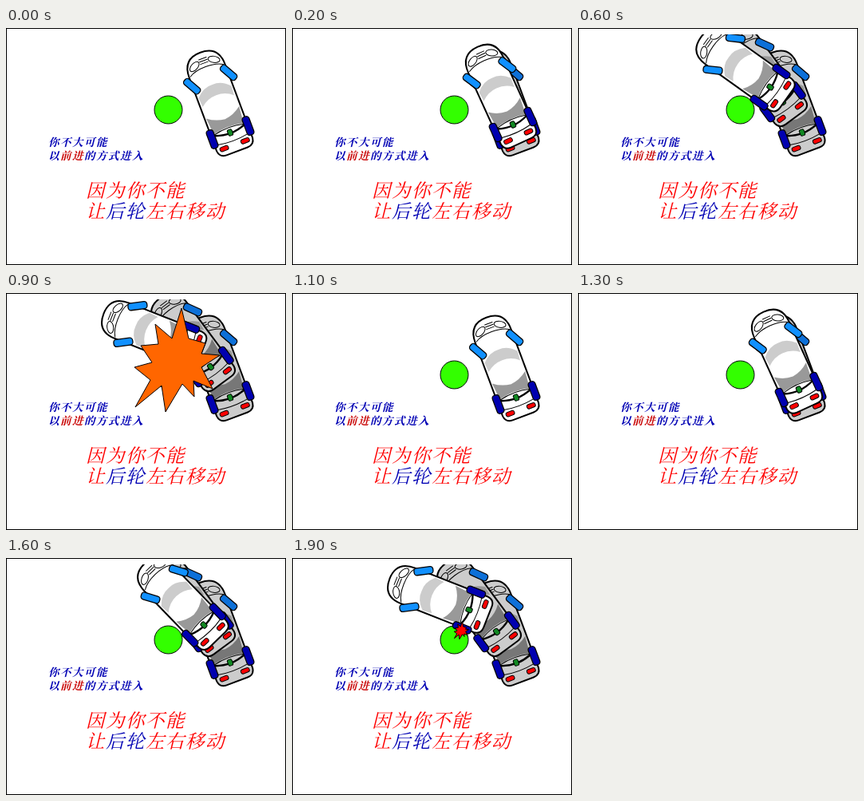
An HTML page for the animation above (2000 ms loop, 351 px wide and 297 px high).

```html
<!DOCTYPE html>
<html lang="zh">
<head>
<meta charset="utf-8">
<style>
  html, body { margin: 0; width: 100%; height: 100%; overflow: hidden; background: #fff; }
  svg { display: block; width: 351px; height: 297px; }
  text { font-family: "Noto Serif CJK SC", "Noto Sans CJK SC", "Noto Sans CJK", serif; font-style: italic; }
  .note { font-size: 13.5px; font-weight: 700; letter-spacing: 1.5px; fill: #0000b4; }
  .reason { font-size: 23.5px; font-weight: 500; letter-spacing: 1.5px; fill: #f00; }
  .red { fill: #c80000; }
  .blue { fill: #0000b4; }
  .car { --body: #fff; --screen: #ccc; --rear: #999; --front: #1090ff; }
  .ghost { --body: #ccc; --screen: #999; --rear: #777; --front: #0d70d8; }
</style>
</head>
<body>
<svg viewBox="0 0 351 297">
  <defs>
    <clipPath id="road"><rect x="1" y="8" width="349" height="288"/></clipPath>
    <rect id="tyre" x="-4.5" y="-12" width="9" height="24" rx="3.5" stroke="#000" stroke-width="1.3"/>
    <g id="lamp">
      <ellipse cx="-13" cy="-93" rx="7.5" ry="4" transform="rotate(-28 -13 -93)" fill="var(--body)"/>
    </g>
    <!-- Origin: middle of the rear axle; the nose points up. -->
    <g id="car" stroke="#000" stroke-linecap="round">
      <path d="M-24 16V-82C-24 -100 -14 -107 0 -107S24 -100 24 -82V16Q23 25 14 25H-14Q-23 25 -24 16Z"
            fill="var(--body)" stroke-width="2"/>
      <path d="M-22 -83Q-14 -88 0 -88Q14 -88 22 -83M-5 -99H5M-5 -96H5M-5 -93H5" fill="none"/>
      <use href="#lamp"/>
      <use href="#lamp" transform="scale(-1 1)"/>
      <path d="M-22 -54Q-12 -65 0 -64Q12 -65 22 -54L21 -42Q12 -50 0 -50Q-12 -50 -21 -42Z"
            fill="var(--screen)" stroke="none"/>
      <path d="M-22 -27Q-12 -19 0 -18Q12 -19 22 -27L20 -5Q0 -10 -20 -5Z"
            fill="var(--rear)" stroke="none"/>
      <path d="M-21 9Q0 13 21 9M-20 -4Q0 -9 20 -4" fill="none"/>
      <path d="M-20 -3Q0 5 20 -3" fill="none" stroke-width="2.4"/>
      <rect x="-3" y="-4" width="6" height="8" rx="2" fill="#118822"/>
      <use href="#tyre" x="-24" fill="#0000b0"/>
      <use href="#tyre" x="24" fill="#0000b0"/>
      <use href="#tyre" transform="translate(-24.5 -71) rotate(-29)" fill="var(--front)"/>
      <use href="#tyre" transform="translate(24.5 -71) rotate(-29)" fill="var(--front)"/>
      <rect x="-19.5" y="13.5" width="11" height="5.5" rx="2.5" fill="#f00"/>
      <rect x="8.5" y="13.5" width="11" height="5.5" rx="2.5" fill="#f00"/>
    </g>
  </defs>
  <rect width="351" height="297" fill="#fff"/>
  <g clip-path="url(#road)">
    <circle cx="203.5" cy="102.5" r="17.5" fill="#33ff00" stroke="#000"/>
    <use id="startGhost" class="ghost" href="#car"/>
    <use id="midGhost" class="ghost" href="#car"/>
    <use id="mover" class="car" href="#car"/>
    <path id="burst" stroke="#000" vector-effect="non-scaling-stroke"
          d="M8 -73L17 -35L38 -29L33 -16L56 -14L33 1L47 28L23 18L24 38L9 22L-12 57L-17 24L-50 51L-31 17L-51 1L-29 -5L-43 -26L-21 -28L-25 -53L-4 -35Z"/>
  </g>
  <text class="note" x="53" y="148">你不大可能</text>
  <text class="note" x="53" y="165">以<tspan class="red">前进</tspan>的方式进入</text>
  <text class="reason" x="100" y="212">因为你不能</text>
  <text class="reason" x="100" y="238">让<tspan class="blue">后轮</tspan>左右移动</text>
  <rect x=".5" y=".5" width="350" height="296" fill="none" stroke="#000"/>
</svg>
<script>
  const STEP = 100, LOOP = 2000, RUN = 11, MID = 4;

  // Rear axle x, y and heading for each step of the drive.
  const poses = [
    [281, 131, -20.5], [279.5, 127, -22], [277, 121, -24.5],
    [268, 107, -30], [256.5, 92.5, -36.5], [248, 84, -44],
    [241, 74, -54.5], [232, 69, -62], [222, 65, -68.5]
  ];
  const last = poses.length - 1;
  // Size and colour of the crash from the moment of contact.
  const bursts = [[0.17, "#ff0000"], [1, "#ff6600"], [1.65, "#ff6600"]];

  const byId = id => document.getElementById(id);
  const show = (el, on) => el.setAttribute("visibility", on ? "visible" : "hidden");
  const place = (el, [x, y, angle]) =>
    el.setAttribute("transform", `translate(${x} ${y}) rotate(${angle})`);

  const mover = byId("mover"), startGhost = byId("startGhost");
  const midGhost = byId("midGhost"), burst = byId("burst");
  place(startGhost, poses[0]);
  place(midGhost, poses[MID]);

  function draw(time) {
    const step = Math.floor((time % LOOP) / STEP) % RUN;
    place(mover, poses[Math.min(step, last)]);
    show(startGhost, step > 0);
    show(midGhost, step > MID);
    show(burst, step >= last);
    if (step >= last) {
      const [size, color] = bursts[step - last];
      burst.setAttribute("transform", `translate(212 92) scale(${size})`);
      burst.setAttribute("fill", color);
    }
  }

  const begin = performance.now();
  function tick() {
    draw(performance.now() - begin);
    requestAnimationFrame(tick);
  }
  draw(0);
  requestAnimationFrame(tick);
</script>
</body>
</html>
```
